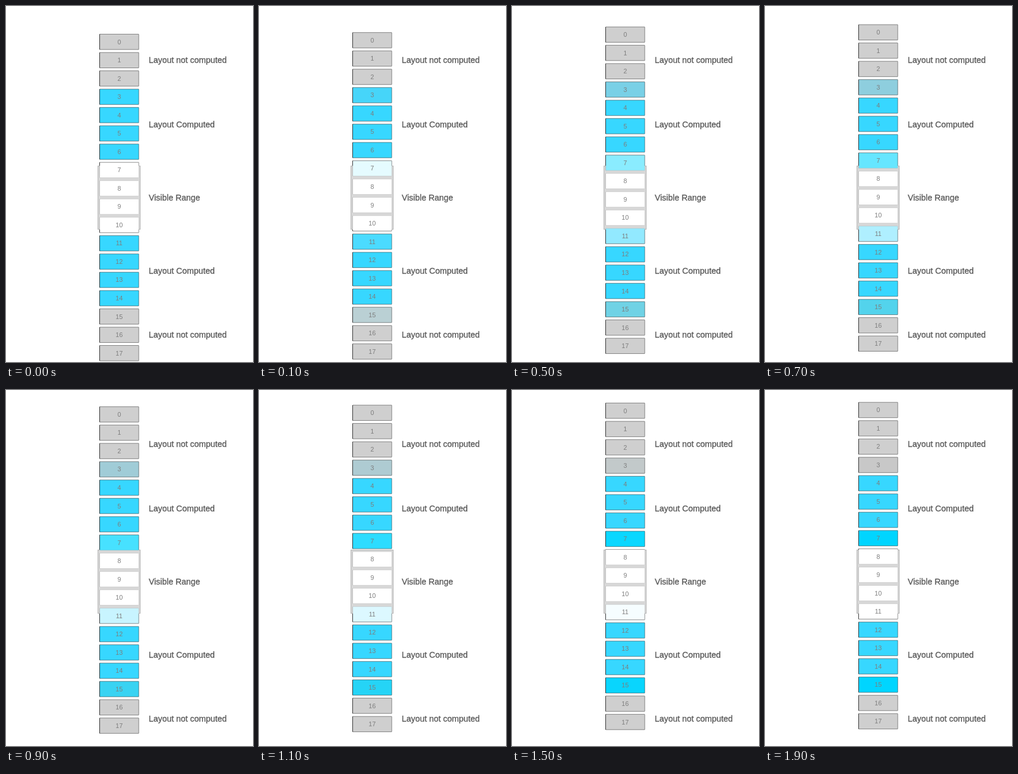
These frames come from a looping animation (426 by 613 pixels, 2.1 s). An HTML page:

```html
<!DOCTYPE html>
<html lang="en">
<head>
<meta charset="utf-8">
<title>Layout range</title>
<style>
  html, body { margin: 0; width: 100%; height: 100%; overflow: hidden; background: #fff; }
  svg { display: block; width: 100%; height: 100%; }
  text { font-family: "Liberation Sans", Arial, Helvetica, sans-serif; }
  #numbers { font-size: 11px; fill: #7d7d7d; text-anchor: middle; }
  #labels { font-size: 14.4px; fill: #5a5a5a; stroke: #5a5a5a; stroke-width: .35; }
</style>
</head>
<body>
<svg viewBox="0 0 426 613">
  <defs>
    <g id="edges" fill="none"></g>
    <clipPath id="inside"><rect x="158" y="275" width="74" height="110"/></clipPath>
    <clipPath id="outside">
      <path clip-rule="evenodd" d="M0 0H426V613H0ZM158 275H232V385H158Z"/>
    </clipPath>
  </defs>
  <rect x="158.5" y="275.5" width="73" height="109" fill="#d8d8d8" stroke="#b4b4b4"/>
  <g id="fills"></g>
  <g clip-path="url(#outside)" stroke="#1c1c1c"><use href="#edges"/></g>
  <g clip-path="url(#inside)" stroke="#b4b4b4"><use href="#edges"/></g>
  <g id="numbers"></g>
  <g id="labels"></g>
</svg>
<script>
const LOOP = 2100, STEP = 100, MOVE = 1900, SHIFT = 27.3;
const ROWS = 18, PITCH = 31.53, LEFT = 161.5, TOP = 48.5, WIDTH = 67.5, HEIGHT = 26.5;
const GRAY = [207, 207, 207], BLUE = [55, 215, 255], WHITE = [255, 255, 255];
const DEEP = [0, 213, 255], DIM = [200, 200, 200];
const changes = { 3: DIM, 7: DEEP, 11: WHITE, 15: DEEP };

const $ = id => document.getElementById(id);

function add(parent, tag, attrs, text = "") {
  const el = document.createElementNS("http://www.w3.org/2000/svg", tag);
  for (const key in attrs) el.setAttribute(key, attrs[key]);
  el.textContent = text;
  return parent.appendChild(el);
}

function startColor(i) {
  if (i < 3 || i > 14) return GRAY;
  return i > 6 && i < 11 ? WHITE : BLUE;
}

const rgb = c => `rgb(${c.map(Math.round)})`;
const mix = (a, b, p) => a.map((v, k) => v + (b[k] - v) * p);

const boxes = [];
for (let i = 0; i < ROWS; i++) {
  const y = TOP + i * PITCH;
  const box = { x: LEFT, y, width: WIDTH, height: HEIGHT };
  boxes.push(add($("fills"), "rect", { ...box, fill: rgb(startColor(i)) }));
  // A fine outline with a heavier left side
  add($("edges"), "rect", { ...box, rx: .5, "stroke-width": .5 });
  add($("edges"), "path", { d: `M${LEFT} ${y}v${HEIGHT}`, "stroke-width": .8 });
  add($("numbers"), "text", { x: 195.2, y: y + 17.1 }, i);
}

[
  ["Layout not computed", 97.5],
  ["Layout Computed", 209],
  ["Visible Range", 335],
  ["Layout Computed", 461],
  ["Layout not computed", 570.5]
].forEach(([text, y]) => add($("labels"), "text", { x: 246.3, y }, text));

function draw(ms) {
  const t = Math.min(Math.floor(ms / STEP) * STEP / MOVE, 1);
  const p = 1 - (1 - t) ** 2;
  for (const id of ["fills", "edges", "numbers"])
    $(id).setAttribute("transform", `translate(0 ${-SHIFT * p})`);
  for (const i in changes)
    boxes[i].setAttribute("fill", rgb(mix(startColor(+i), changes[i], p)));
}

const start = performance.now();
function tick() {
  draw((performance.now() - start) % LOOP);
  requestAnimationFrame(tick);
}
tick();
</script>
</body>
</html>
```
